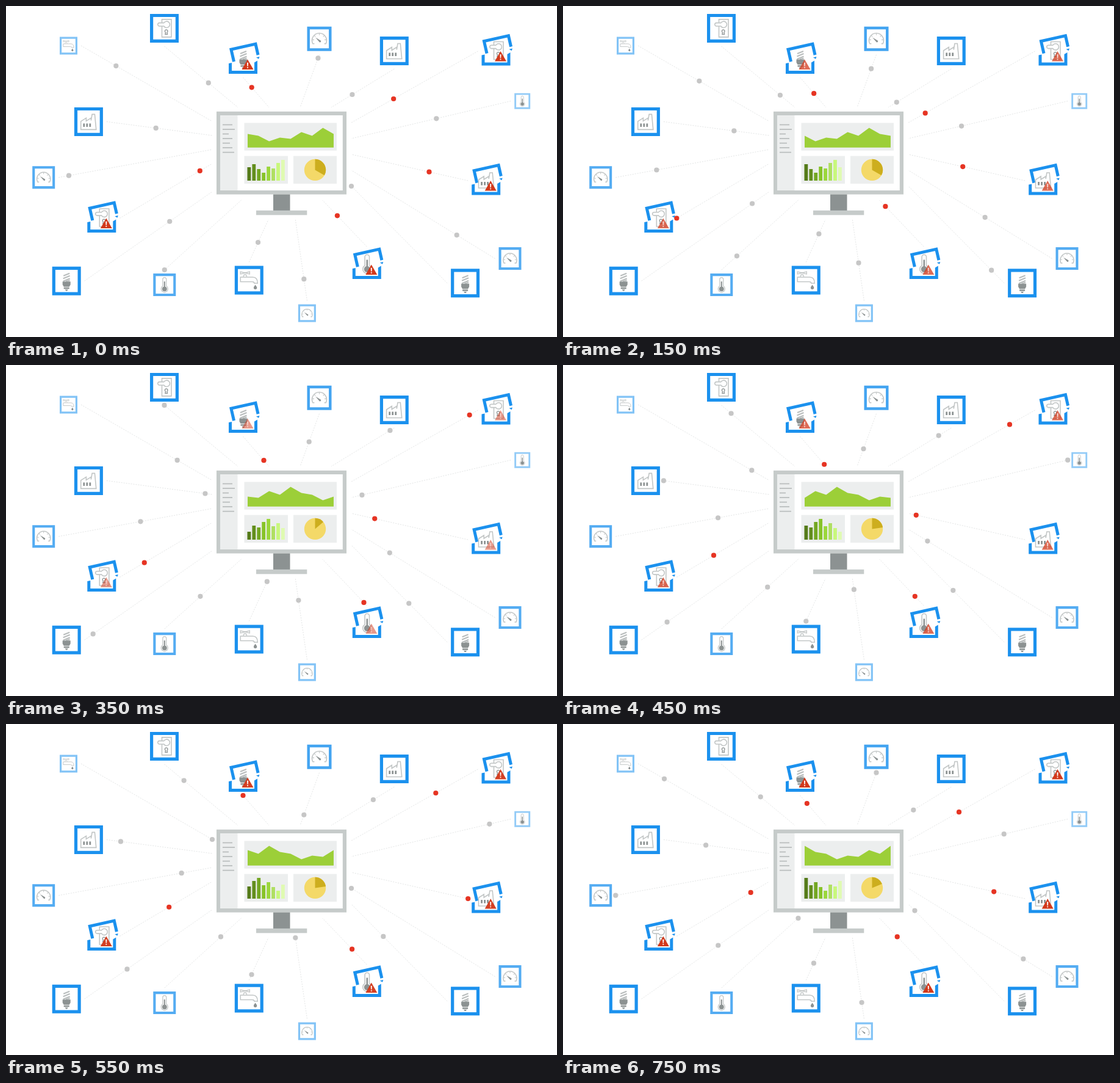
Write an HTML page with a canvas that moves like this. It is 903 px wide and 542 px high and loops after 800 ms.

```html
<!DOCTYPE html>
<html>
<head>
<meta charset="utf-8">
<style>
html, body { margin: 0; width: 100%; height: 100%; overflow: hidden; background: #fff; }
canvas { display: block; }
</style>
</head>
<body>
<canvas id="stage" width="903" height="542"></canvas>
<script>
const ctx = document.getElementById('stage').getContext('2d');
const BLUE = '#1b91ee', LIGHT = '#c2c6c6', DARK = '#8c9292', PANEL = '#eceeee', FRAME = '#c6cbca';
const STEPS = 16, STEP_MS = 50;

// Evenly spaced ports around the screen; toward points from a device to the screen.
// Devices are [icon, x, y, phase, size], "!" marks an alert, null is a free port.
const sides = [
  {
    port: i => [338, 189 + 23 * i], toward: [1, 0],
    devices: [['faucet', 102.5, 65, 4, 29], ['factory', 135.4, 189.4, 7], ['gauge', 61.7, 280.7, 1, 37],
      ['door!', 156.8, 347.5, 13], null, ['bulb', 99.2, 450.2, 10]]
  },
  {
    port: i => [566, 191 + 26 * i], toward: [-1, 0],
    devices: [['door!', 803, 74, 10], ['thermometer', 846.2, 155.7, 7, 26], ['factory!', 786.7, 286, 5],
      ['gauge', 826, 413.6, 4, 37], ['bulb', 752.6, 453.8, 15]]
  },
  {
    port: i => [380 + 51 * i, 166], toward: [0, 1],
    devices: [['door', 259.5, 36.4, 9], ['bulb!', 388.5, 87.5, 5], ['gauge', 513.5, 53.7, 1, 40],
      ['factory', 636.3, 73.5, 10]]
  },
  {
    port: i => [385.5 + 44.4 * i, i % 3 ? 350 : 318], toward: [0, -1],
    devices: [['thermometer', 259.8, 456.6, 0, 37], ['faucet', 398.3, 449, 7], ['gauge', 493.4, 503, 4, 29],
      ['thermometer!', 591.3, 423.5, 10]]
  }
];

const devices = sides.flatMap(({ port, toward, devices }) => devices.map((device, i) => {
  if (!device) return null;
  const [name, x, y, phase, size = 47] = device;
  const [x1, y1] = port(i), reach = size / 2 + 6;
  return {
    icon: name.replace('!', ''), alert: name.endsWith('!'), x, y, phase, size,
    x0: x + toward[0] * reach, y0: y + toward[1] * reach, x1, y1
  };
})).filter(Boolean);

// One period of each scrolling chart
const areaHeights = [22, 19, 10, 16, 14, 25, 19, 32];
const barHeights = [22, 27, 19, 13, 23, 20, 29, 34];
const pieAngles = [120, 120, 82, 50, 82, 82, 68, 68];
const menuWidths = [16, 20, 10, 16, 12, 16, 19];

function rect(color, x, y, w, h) {
  ctx.fillStyle = color;
  ctx.fillRect(x, y, w, h);
}
function fill(d, color) {
  ctx.fillStyle = color;
  ctx.fill(new Path2D(d));
}
function line(d, color = LIGHT, width = 1.6) {
  ctx.strokeStyle = color;
  ctx.lineWidth = width;
  ctx.stroke(new Path2D(d));
}
function disc(x, y, r, color, degrees = 360) {
  const top = -Math.PI / 2;
  ctx.fillStyle = color;
  ctx.beginPath();
  if (degrees < 360) ctx.moveTo(x, y);
  ctx.arc(x, y, r, top, top + degrees * Math.PI / 180);
  ctx.fill();
}
function place(x, y, draw, { scale = 1, angle = 0, alpha = 1 } = {}) {
  ctx.save();
  ctx.translate(x, y);
  ctx.rotate(angle);
  ctx.scale(scale, scale);
  ctx.globalAlpha = alpha;
  draw();
  ctx.restore();
}

// Icons are drawn around 0,0 in a box 47 wide
const icons = {
  door() {
    line('M-4-14.5H11.5V14.5H-4Z');
    const handle = 'M-.7-8.8H-8a2.7 2.7 0 0 0 0 5.4H-.7A5.2 5.2 0 1 0-.7-8.8Z';
    fill(handle, '#fff');
    line(handle);
    line('M2 6.8A2.3 2.3 0 1 1 4.4 6.8L5 10H1.4Z', DARK, 1.3);
  },
  factory() {
    line('M-12.7 13V-.5L-4-6V-1L4-6V-2L5.7-12H10L12.4 13Z');
    for (const x of [-9, -4, 1]) rect(DARK, x, 3, 2.8, 5.5);
  },
  bulb() {
    line('M-5-8.5L5-12.5M-5.5-4L5.5-8.5M-5.5 .5L5.5-4M-1 1L5.5-1', '#b9bdbd', 2);
    fill('M-6.5 1H6.5V6L4.5 9.5H-4.5L-6.5 6ZM-4.5 10.5H4.5V13H-4.5ZM-2.5 14H2.5L1 16.3H-1Z', DARK);
  },
  gauge() {
    line('M-9.5 9.5H-12.5A14 14 0 1 1 12.5 9.5H9.5', LIGHT, 1.9);
    line('M-13.3 2H-10M-9.5-6.2L-7.4-4M0-10V-7M9.5-6.2L7.4-4M13.3 2H10', LIGHT, 1.3);
    fill('M-7.5-2.5L2.8 3.5A2 2 0 0 1 .3 6.5Z', DARK);
  },
  thermometer() {
    line('M-3.7 2.5V-11.5a3.7 3.7 0 0 1 7.4 0V2.5A7 7 0 1 1-3.7 2.5Z');
    line('M0-7V8', DARK, 2.6);
    disc(0, 8.6, 5, DARK);
  },
  faucet() {
    line('M-14-5H6Q14-5 14 5H8.5Q8.5 2.5 5 2.5H-14Z', LIGHT, 1.5);
    line('M-14-14V-10L1-14V-10ZM-9.5-5.5L-8-9H-5L-3.5-5.5', LIGHT, 1.3);
    fill('M10.3 7.5C11.3 9.5 13 10.6 13 12.2a2.7 2.7 0 0 1-5.4 0C7.6 10.6 9.3 9.5 10.3 7.5Z', DARK);
  }
};

function drawDevice({ icon, x, y, size }) {
  const scale = size / 47;
  const box = () => line('M-20.9-20.9H20.9V20.9H-20.9Z', BLUE, 5.2);
  place(x, y, box, { scale, alpha: 1 - (47 - size) * .025 });
  place(x, y, icons[icon], { scale });
}

function drawAlert({ icon, x, y }, alpha) {
  place(x, y, () => {
    fill('M-23.5 6.5L-18.5 5.5V18.5H18.5V5L23.5 2V23.5H-23.5Z', BLUE);
    fill('M21.5-3.2L27-4.5L25.7-.8Z', BLUE);
  });
  place(x - 22.5, y - 18.2, () => line('M2.5 23V2.5H43.5V21', BLUE, 5), { angle: -.223 });
  place(x + .5, y - 1, icons[icon]);
  place(x, y, () => {
    fill('M7.5 0L17 16.5H-2Z', '#d2391b');
    fill('M6.4 5.2H8.6L8.2 11.2H6.8ZM6.6 12.4H8.4V14.2H6.6Z', '#fff');
  }, { alpha });
}

function drawMonitor(shift) {
  rect(FRAME, 345, 172.8, 213, 135.7);
  rect('#fff', 351.3, 179, 200.5, 123);
  rect(PANEL, 351.3, 179, 28.2, 123);
  rect(DARK, 438, 308.5, 27.5, 26.5);
  rect(FRAME, 410, 334.8, 83.3, 7.5);
  menuWidths.forEach((w, i) => rect('#b8bcbc', 355, 193.6 + i * 7.53, w, 1.7));
  rect(PANEL, 390.5, 191.5, 151.5, 45.2);
  rect(PANEL, 390.5, 245.6, 71.5, 45.3);
  rect(PANEL, 471, 245.6, 71, 45.3);

  let area = 'M396 231.7';
  for (let i = 0; i < 9; i++) area += `L${396 + i * 17.62} ${231.5 - areaHeights[(i + shift) % 8]}`;
  fill(area + 'V231.7Z', '#9ccf38');

  for (let i = 0; i < 8; i++) {
    const height = barHeights[(i + shift) % 8];
    const lightness = 29 + 4 * i + .55 * i * i;
    rect(`hsl(83, ${i < 6 ? 66 : 90}%, ${lightness}%)`, 395.5 + i * 7.93, 286 - height, 5.8, height);
  }

  disc(506.5, 268.4, 17.7, '#f4d968');
  disc(506.5, 268.4, 17.7, '#cdae1e', pieAngles[shift]);
}

function draw(now) {
  const step = Math.floor(now / STEP_MS) % STEPS;
  const alertAlpha = step < 12 ? .74 + .26 * Math.cos(step * Math.PI / 6) : 1;
  rect('#fff', 0, 0, 903, 542);

  ctx.setLineDash([2, 2]);
  for (const { x0, y0, x1, y1 } of devices) line(`M${x0} ${y0}L${x1} ${y1}`, '#e3e5e5', 1);
  ctx.setLineDash([]);

  drawMonitor(step >> 1);
  for (const device of devices) device.alert ? drawAlert(device, alertAlpha) : drawDevice(device);

  for (const { x0, y0, x1, y1, phase, alert } of devices) {
    const p = (step + phase) % STEPS / (STEPS - 1);
    disc(x0 + (x1 - x0) * p, y0 + (y1 - y0) * p, 4.1, alert ? '#e63423' : '#c6c6c6');
  }
  requestAnimationFrame(draw);
}
requestAnimationFrame(draw);
</script>
</body>
</html>
```
